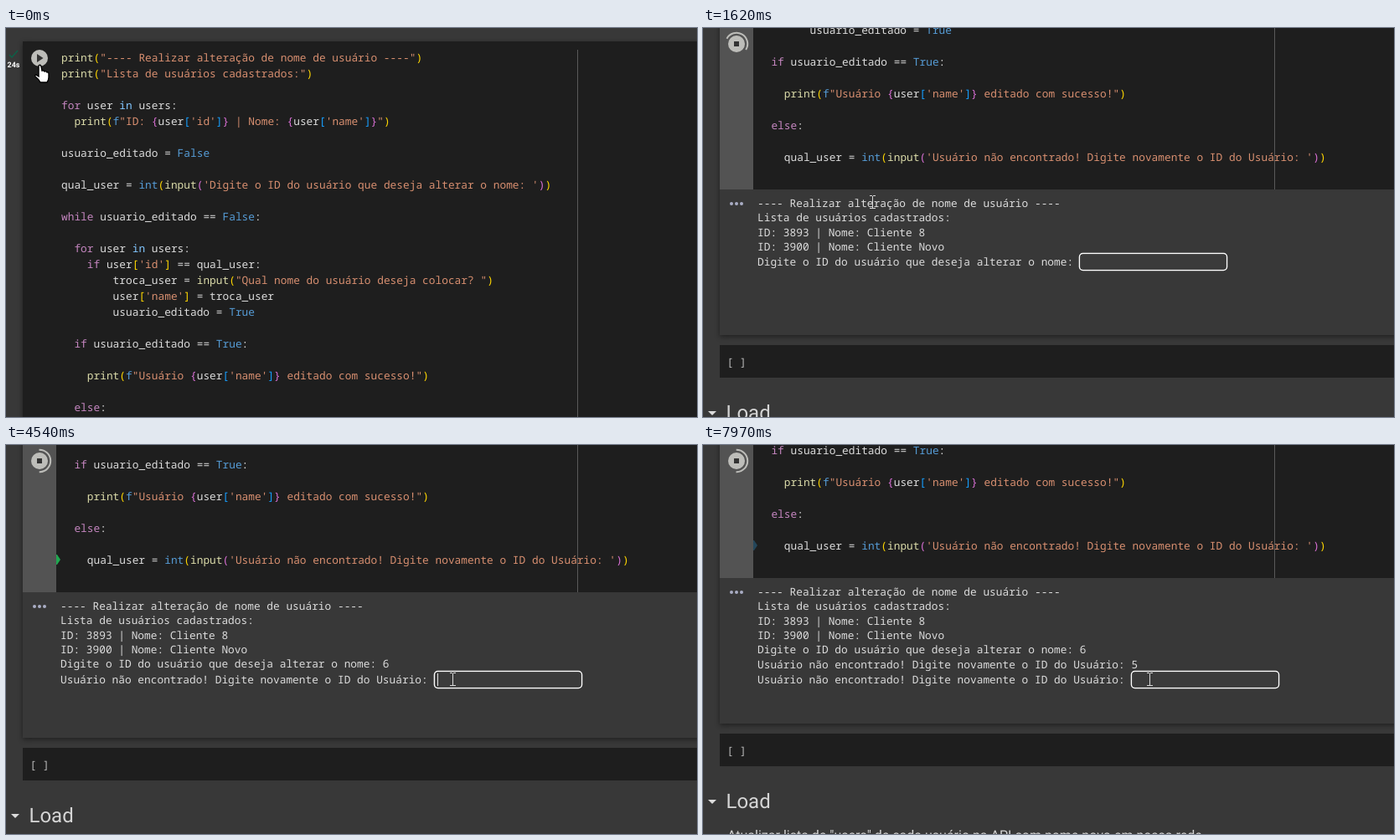
An HTML page with a canvas that plays this animation: 825x465 px, repeating every 8 s.

```html
<!DOCTYPE html>
<html lang="pt">
<head>
<meta charset="utf-8">
<title>Notebook</title>
<style>
html, body { margin: 0; width: 100%; height: 100%; overflow: hidden; background: #383838; }
canvas { display: block; }
</style>
</head>
<body>
<canvas id="stage" width="825" height="465"></canvas>
<script>
const ctx = document.getElementById('stage').getContext('2d');
const LOOP = 8000, CELL = 7.7, W = 825, H = 465;
const MONO = '12.83px "Noto Sans Mono", monospace';
const SANS = 'Roboto, sans-serif';

// Event times in ms
const RUN = 70, FOCUS = 880, KEY1 = 3900, ENTER1 = 4400, KEY2 = 5850, ENTER2 = 6210;

const CODE = `print("---- Realizar alteração de nome de usuário ----")
print("Lista de usuários cadastrados:")

for user in users:
  print(f"ID: {user['id']} | Nome: {user['name']}")

usuario_editado = False

qual_user = int(input('Digite o ID do usuário que deseja alterar o nome: '))

while usuario_editado == False:

  for user in users:
    if user['id'] == qual_user:
        troca_user = input("Qual nome do usuário deseja colocar? ")
        user['name'] = troca_user
        usuario_editado = True

  if usuario_editado == True:

    print(f"Usuário {user['name']} editado com sucesso!")

  else:

    qual_user = int(input('Usuário não encontrado! Digite novamente o ID do Usuário: '))`.split('\n');

const HEAD = [
  '---- Realizar alteração de nome de usuário ----',
  'Lista de usuários cadastrados:',
  'ID: 3893 | Nome: Cliente 8',
  'ID: 3900 | Nome: Cliente Novo'
];
const ASK = 'Digite o ID do usuário que deseja alterar o nome: ';
const RETRY = 'Usuário não encontrado! Digite novamente o ID do Usuário: ';

const PLAIN = '#dcdcdc', STRING = '#d88f70', BLUE = '#569cd6';
const BRACKETS = ['#ffd700', '#da70d6', '#179fff'];
const WORDS = { print: '#dcdcaa', input: '#dcdcaa', int: BLUE, True: BLUE, False: BLUE, in: '#82c6ff' };
for (const w of ['for', 'while', 'if', 'else']) WORDS[w] = '#c586c0';

function tokenize(line) {
  const out = [];
  let depth = 0;
  const add = (text, col, color) => out.push({ text, col, color });
  function scan(src, start) {
    for (const m of src.matchAll(/f?"[^"]*"|'[^']*'|\w+|\S/g)) {
      const s = m[0], col = start + m.index;
      if (s.startsWith('f"')) {
        add('f', col, BLUE);
        let at = col + 1;
        for (const part of s.slice(1).split(/(\{[^}]*\})/)) {
          if (part[0] === '{') scan(part, at);
          else add(part, at, STRING);
          at += part.length;
        }
      } else if (/^["']/.test(s)) add(s, col, STRING);
      else if ('([{'.includes(s)) add(s, col, BRACKETS[depth++ % 3]);
      else if (')]}'.includes(s)) add(s, col, BRACKETS[--depth % 3]);
      else add(s, col, WORDS[s] || PLAIN);
    }
  }
  scan(line, 0);
  return out;
}
const TOKENS = CODE.map(tokenize);

function rect(x, y, w, h, color) {
  ctx.fillStyle = color;
  ctx.fillRect(x, y, w, h);
}

function text(s, x, y, color, font = MONO) {
  ctx.font = font;
  ctx.fillStyle = color;
  ctx.fillText(s, x, y);
}

function disc(x, y, r, color) {
  ctx.fillStyle = color;
  ctx.beginPath();
  ctx.arc(x, y, r, 0, Math.PI * 2);
  ctx.fill();
}

function poly(points, color) {
  ctx.fillStyle = color;
  ctx.beginPath();
  for (const [x, y] of points) ctx.lineTo(x, y);
  ctx.fill();
}

// Linear interpolation over [time, ...values] keys
function track(keys, t) {
  if (t <= keys[0][0]) return keys[0].slice(1);
  for (let i = 1; i < keys.length; i++) {
    const a = keys[i - 1], b = keys[i];
    if (t < b[0]) {
      const k = (t - a[0]) / (b[0] - a[0]);
      return a.slice(1).map((v, j) => v + (b[j + 1] - v) * k);
    }
  }
  return keys[keys.length - 1].slice(1);
}

const POINTER = [
  [410, 42, 54], [660, 92, 102], [900, 202, 208], [1650, 202, 208],
  [1950, 390, 306], [2100, 470, 314], [2400, 533, 280]
];
const SPIN = [
  [410, -100], [660, -10], [1620, 300], [4150, 1260],
  [5620, 1935], [6270, 2255], [7970, 2880], [8000, 2891]
];

const scrollAt = t => t < FOCUS ? 0 : t < ENTER1 ? 337 : t < ENTER2 ? 354 : 371;

function drawPage() {
  ctx.save();
  ctx.shadowColor = 'rgba(0,0,0,.45)';
  ctx.shadowBlur = 6;
  ctx.shadowOffsetY = 2;
  rect(20, 16, W, 688, '#383838');
  ctx.restore();
  rect(20, 16, W, 514, '#1e1e1e');
  rect(682, 26, 1, 504, '#5a5a5a');

  rect(20, 716, W, 39, '#1e1e1e');
  text('[ ]', 28.5, 741, '#b8b8b8');
  poly([[6, 795], [16, 795], [11, 800]], '#dcdcdc');
  text('Load', 27.5, 805, '#d5d5d5', '24px ' + SANS);
  text('Atualizar lista de "users" de cada usuário na API com nome novo em nossa rede',
    29, 843, '#d5d5d5', '16px ' + SANS);
}

function drawCode() {
  TOKENS.forEach((line, i) => {
    for (const k of line) text(k.text, 66 + k.col * CELL, 40 + i * 19, k.color);
  });
}

function drawOutput(t) {
  const lines = [...HEAD];
  let prompt = ASK, typed = t >= KEY1 ? '6' : '', since = t >= KEY1 ? KEY1 : FOCUS;
  if (t >= ENTER1) {
    lines.push(ASK + '6');
    prompt = RETRY;
    typed = t >= KEY2 ? '5' : '';
    since = t >= KEY2 ? KEY2 : ENTER1;
  }
  if (t >= ENTER2) {
    lines.push(RETRY + '5');
    typed = '';
    since = ENTER2;
  }
  for (const x of [34, 40, 46]) disc(x, 547, 2, '#a9adc4');
  const rowY = i => Math.round(551 + i * 17.33);
  lines.forEach((s, i) => text(s, 65, rowY(i), PLAIN));

  const y = rowY(lines.length) + 1, x = Math.round(65 + prompt.length * CELL) - 1;
  text(prompt, 65, y, PLAIN);
  ctx.lineWidth = 1;
  ctx.fillStyle = '#3b3b3b';
  ctx.strokeStyle = '#101010';
  ctx.beginPath();
  ctx.roundRect(x + 1.5, y - 13.5, 174, 18, 2);
  ctx.fill();
  ctx.stroke();
  ctx.lineWidth = 1.5;
  ctx.strokeStyle = '#fff';
  ctx.beginPath();
  ctx.roundRect(x + .5, y - 14.5, 176, 20, 4);
  ctx.stroke();
  text(typed, x + 3.5, y, PLAIN);
  if ((t - since) % 1000 < 500) rect(x + 4 + Math.round(typed.length * CELL), y - 12, 1, 15, '#e8e8e8');
}

function drawButton(t, y) {
  const grey = '#bdbdb9', ink = '#333';
  disc(40, y, 10, grey);
  if (t < RUN) {
    poly([[37, y - 5], [37, y + 5], [44.5, y]], ink);
    return;
  }
  rect(37, y - 3, 6, 6, ink);
  if (t < 410) return;
  const a = track(SPIN, t)[0] * Math.PI / 180;
  ctx.strokeStyle = grey;
  ctx.lineWidth = 2;
  ctx.beginPath();
  ctx.arc(40, y, 13.2, a - 1.6, a + 1.6);
  ctx.stroke();
}

function drawStatus() {
  ctx.strokeStyle = '#0d6148';
  ctx.lineWidth = 1.5;
  ctx.beginPath();
  ctx.moveTo(4, 32);
  ctx.lineTo(7, 35);
  ctx.lineTo(14, 27);
  ctx.stroke();
  text('24s', 1.5, 47, '#fff', 'bold 9px ' + SANS);
}

const HAND = new Path2D('M-3-9q2-2 3 1l1 5q2-1 3 1q2-1 3 1q2-1 2 2v4q0 3-2 6h-8q-2-4-6-7q-1-2 1-2l3 2z');

function drawPointer(t) {
  const [x, y] = track(POINTER, t);
  if (x < 60) {
    ctx.save();
    ctx.translate(x, y);
    ctx.fillStyle = '#fff';
    ctx.strokeStyle = '#000';
    ctx.lineWidth = 1.4;
    ctx.fill(HAND);
    ctx.stroke(HAND);
    ctx.restore();
    return;
  }
  const px = Math.round(x), py = Math.round(y);
  rect(px, py - 7, 1, 15, '#d8d8d8');
  for (const dy of [-8, 7]) {
    rect(px - 3, py + dy, 3, 1, '#d8d8d8');
    rect(px + 1, py + dy, 3, 1, '#d8d8d8');
  }
}

function draw(t) {
  const scroll = scrollAt(t);
  ctx.textRendering = 'geometricPrecision';
  rect(0, 0, W, H, '#383838');
  ctx.save();
  ctx.translate(0, -scroll);
  drawPage();
  if (t >= RUN) rect(20, 16, 40, 514, '#535353');
  drawCode();
  if (t >= FOCUS) drawOutput(t);
  if (t >= ENTER1) poly([[60, 485], [61, 485], [65, 491], [61, 497], [60, 497]], t < ENTER2 ? '#1fa850' : '#24465a');
  if (t < RUN) drawStatus();
  ctx.restore();
  drawButton(t, Math.max(36 - scroll, 19));
  drawPointer(t);
}

const start = performance.now();
function tick() {
  draw((performance.now() - start) % LOOP);
  requestAnimationFrame(tick);
}
draw(0);
requestAnimationFrame(tick);
</script>
</body>
</html>
```
